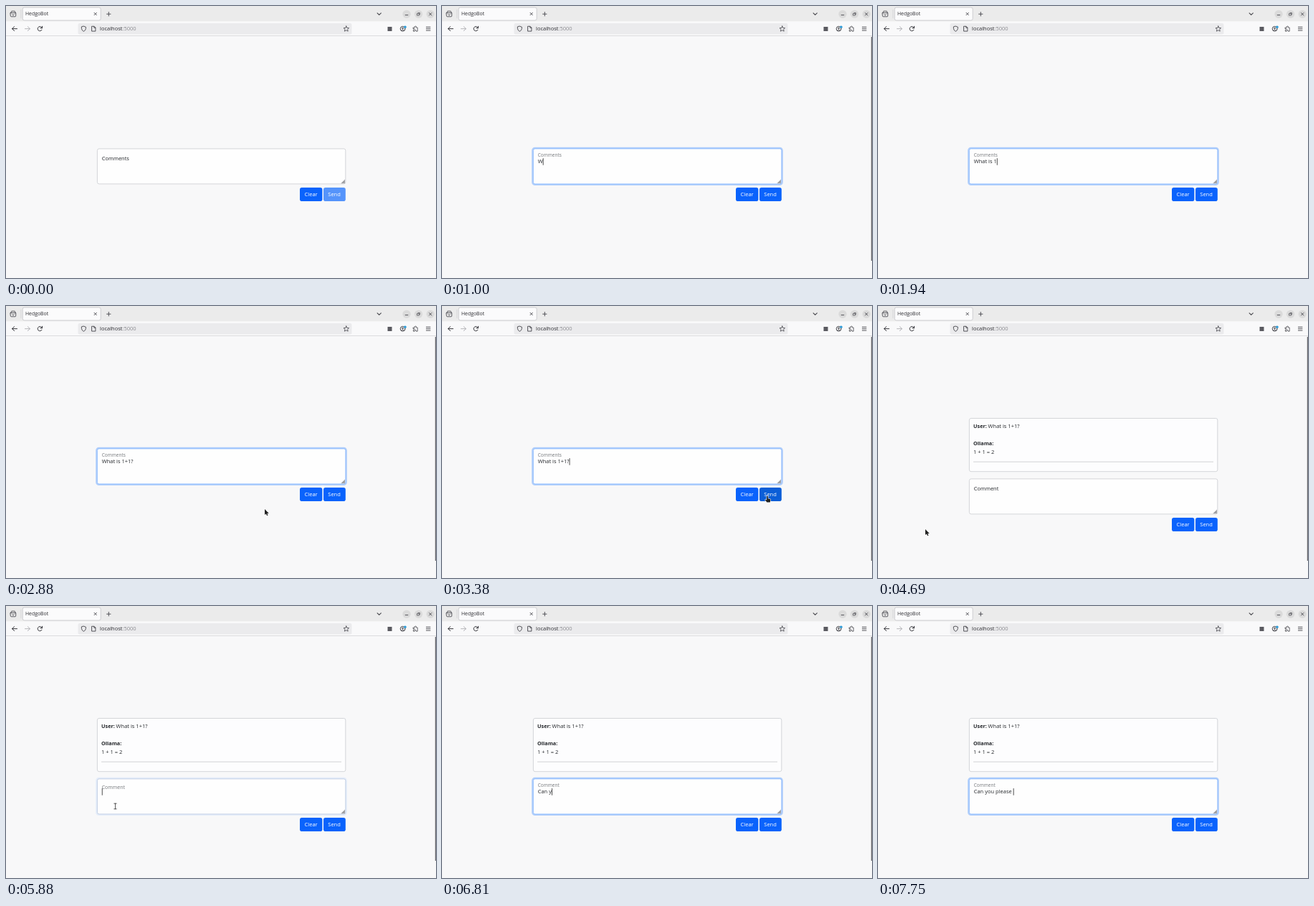
An HTML page with a canvas for the animation above (8000 ms loop, 600 px wide and 379 px high).

```html
<!DOCTYPE html>
<html lang="en">
<head>
<meta charset="utf-8">
<title>Chat page</title>
<style>
html, body { margin: 0; width: 100%; height: 100%; overflow: hidden; background: #f8f8f9; }
canvas { display: block; width: 600px; height: 379px; }
</style>
</head>
<body>
<canvas id="stage"></canvas>
<script>
const LOOP = 8000, STEP = 62.5;
const FONT = '"Open Sans", "Noto Sans", sans-serif';
const INK = '#24272b', ICON = '#45454b', BLUE = '#0a63fc', HOVER = '#0b5ed7';
const LEFT = 127, WIDTH = 347;

const canvas = document.getElementById('stage');
const ctx = canvas.getContext('2d');
const dpr = window.devicePixelRatio || 1;
canvas.width = 600 * dpr;
canvas.height = 379 * dpr;

// Times of the main events
const FOCUS_1 = 610, SEND = 3490, REPLY = 4300, DONE = 4610, FOCUS_2 = 5823;

const typing = [
  { text: 'What is 1+1?', keys: [990, 1120, 1185, 1245, 1370, 1435, 1555, 1680, 1930, 2060, 2185, 2430] },
  { text: 'Can you please ', keys: [6245, 6495, 6555, 6685, 6805, 6870, 6930, 7055, 7180, 7240, 7305, 7370, 7495, 7620, 7740] }
];

// Pointer paths: time, x, y
const paths = [
  [[60, 420, 318], [250, 352, 270], [450, 262, 230], [990, 260, 229]],
  [[2620, 260, 229], [2750, 304, 256], [2875, 361, 283], [3060, 418, 277], [3310, 455, 265],
   [3500, 452, 265], [3562, 442, 266], [3625, 403, 271], [3688, 280, 286], [3750, 132, 304],
   [3812, 66, 311], [4870, 66, 311], [5060, 78, 305], [5310, 122, 288], [5620, 152.5, 279], [6245, 152.5, 279]]
];

const clamp = v => Math.max(0, Math.min(1, v));
const ease = v => { v = clamp(v); return v * v * (3 - 2 * v); };
const mix = (a, b, k) => a + (b - a) * k;

function write(str, x, y, size = 7.5, color = INK, weight = 400) {
  ctx.font = `${weight} ${size}px ${FONT}`;
  ctx.fillStyle = color;
  ctx.fillText(str, x, y);
}

function box(x, y, w, h, r, fill, stroke, line = 1) {
  ctx.beginPath();
  ctx.roundRect(x, y, w, h, r);
  if (fill) { ctx.fillStyle = fill; ctx.fill(); }
  if (stroke) { ctx.strokeStyle = stroke; ctx.lineWidth = line; ctx.stroke(); }
}

function rect(x, y, w, h, color) {
  ctx.fillStyle = color;
  ctx.fillRect(x, y, w, h);
}

function disc(x, y, r, color) {
  ctx.beginPath();
  ctx.arc(x, y, r, 0, 7);
  ctx.fillStyle = color;
  ctx.fill();
}

// Line icon centred on x, y
function icon(x, y, d, color = ICON, line = 0.9) {
  ctx.save();
  ctx.translate(x, y);
  ctx.strokeStyle = color;
  ctx.lineWidth = line;
  ctx.lineCap = ctx.lineJoin = 'round';
  ctx.stroke(new Path2D(d));
  ctx.restore();
}

function drawBrowser() {
  rect(0, 0, 600, 379, '#f8f8f9');
  rect(0, 0, 600, 21.5, '#ebebeb');
  rect(0, 21.5, 600, 20, '#f9f9fa');
  rect(0, 41, 600, 0.8, '#d6d6d8');

  icon(10, 11, 'M-3.7 -1.4H3.7V2.8Q3.7 3.8 2.7 3.8H-2.7Q-3.7 3.8 -3.7 2.8ZM-3.3 -1.6L-2.2 -3.8H2.2L3.3 -1.6M-1.3 .8L0 2L1.3 .8');
  rect(20.5, 5, 0.7, 12, '#d2d2d4');
  box(23.2, 2, 109, 18, 2.5, '#fbfbfc', '#c4c4c8', 0.8);
  write('HedgoBot', 27, 13.4, 6.9, '#2c2c31');
  icon(124.7, 11, 'M-1.7 -1.7L1.7 1.7M1.7 -1.7L-1.7 1.7');
  icon(143.3, 11.2, 'M-2.7 0H2.7M0 -2.7V2.7');
  icon(520.7, 11, 'M-2.6 -1.2L0 1.4L2.6 -1.2', ICON, 1.1);
  for (const x of [559, 575.6, 592.2]) disc(x, 11.3, 5.6, '#dadada');
  icon(559, 12.6, 'M-1.8 0H1.8');
  icon(575.6, 11.3, 'M-1.7 -.7H.8V1.8H-1.7ZM-.6 -1.8H1.8V.6', ICON, 0.7);
  icon(592.2, 11.3, 'M-1.7 -1.7L1.7 1.7M1.7 -1.7L-1.7 1.7');

  icon(12, 31.7, 'M3.5 0H-3.4M-.4 -3L-3.4 0L-.4 3', '#303036', 1);
  icon(30, 31.7, 'M-3.5 0H3.4M.4 -3L3.4 0L.4 3', '#b4b4b8', 1);
  icon(47.3, 31.7, 'M3 -.9A3.1 3.1 0 1 0 2.7 1.6M3.2 -3.4V-.9H.8', '#303036', 1);

  box(100.5, 24, 382, 15.4, 2.5, '#ebebed');
  icon(108.4, 31.7, 'M0 -3.5L3 -2.4V-.4Q2.8 2.3 0 3.7Q-2.8 2.3 -3 -.4V-2.4Z');
  icon(122.4, 31.7, 'M-2.4 -3.4H.6L2.5 -1.5V3.4H-2.4ZM.5 -3.3V-1.4H2.4');
  write('localhost', 131, 34.3, 7.5, '#2c2c31');
  const hostWidth = ctx.measureText('localhost').width;
  write(':5000', 131 + hostWidth, 34.3, 7.5, '#8c8c91');
  icon(474.8, 31.8, 'M0 -3.8L1.1 -1.3L3.8 -1.1L1.8 .7L2.4 3.4L0 2L-2.4 3.4L-1.8 .7L-3.8 -1.1L-1.1 -1.3Z', ICON, 0.8);

  box(532.5, 29, 6, 6, 0, '#5a5a60');
  icon(553.6, 31.8, 'M3.4 0A3.4 3.4 0 1 1 -3.4 0A3.4 3.4 0 1 1 3.4 0M-2 2.4Q0 .2 2 2.4M-.9 -.8A.9 .9 0 1 0 .9 -.8A.9 .9 0 1 0 -.9 -.8', ICON, 1);
  disc(556.9, 29.3, 1.8, '#2d9bd8');
  icon(571.4, 31.8, 'M-3 -1.8H-1Q-1.5 -3.7 0 -3.7Q1.5 -3.7 1 -1.8H2.8V3.4H.9Q.9 1.6 -.2 1.6Q-1.3 1.6 -1.2 3.4H-3V1.3Q-1.3 1.4 -1.3 .4Q-1.3 -.6 -3 -.3Z', ICON, 0.8);
  icon(589.2, 31.7, 'M-2.8 -2.4H2.8M-2.8 0H2.8M-2.8 2.4H2.8');
}

function drawChat(t, top, h) {
  box(LEFT + 0.4, top + 0.5, WIDTH - 0.6, h - 0.8, 2.5, '#fdfdfe', '#c9ccd0', 0.8);
  write('User:', 133, top + 14.2, 7.3, INK, 700);
  write('What is 1+1?', 153.6, top + 14.2);
  if (t < REPLY) return;
  write('Ollama:', 133, top + 38, 7.3, INK, 700);
  const shown = 1 + 2 * Math.floor((t - REPLY) / STEP);
  write('1 + 1 = 2'.slice(0, shown), 133, top + 49.8);
  if (t >= DONE) rect(133, top + 60.7, 335, 0.8, '#c6c7c9');
}

function drawField(t, top, label, focusAt, entry) {
  const lift = ease((t - focusAt) / 100), glow = ease((t - focusAt) / 150);
  if (glow) box(LEFT - 0.6, top - 0.6, WIDTH + 1.2, 51, 3.2, null, `rgba(13,110,253,${0.3 * glow})`, 2.4);
  const edge = [[201, 134], [204, 183], [208, 254]].map(([a, b]) => Math.round(mix(a, b, glow)));
  box(LEFT + 0.4, top + 0.4, WIDTH - 0.6, 49, 2.5, '#fefefe', `rgb(${edge})`, 0.8);

  ctx.beginPath();
  ctx.moveTo(473, top + 43);
  ctx.lineTo(473, top + 48.8);
  ctx.lineTo(467.2, top + 48.8);
  ctx.fillStyle = '#a8a9ac';
  ctx.fill();
  icon(472, top + 47.8, 'M-2 0L0 -2', '#77787b', 0.6);

  write(label, 133.7, top + mix(16.7, 11.7, lift), mix(7.5, 6.5, lift), lift > 0 ? '#74777b' : INK);
  if (!lift) return;
  const keys = entry.keys.filter(k => k <= t);
  const text = entry.text.slice(0, keys.length);
  write(text, 133.7, top + 20.9);
  const last = keys.length ? keys[keys.length - 1] : focusAt;
  if ((t - last) % 800 < 400) rect(133.8 + ctx.measureText(text).width, top + 13.6, 0.8, 9.6, '#222');
}

function drawButton(x, y, w, label, textX, color) {
  box(x, y, w, 19, 2.8, color);
  write(label, textX, y + 12.2, 7.5, '#fff');
}

function pointerAt(t) {
  const path = paths.find(p => t >= p[0][0] && t < p[p.length - 1][0]);
  if (!path) return null;
  const i = path.findIndex(p => p[0] > t);
  const [t0, x0, y0] = path[i - 1], [t1, x1, y1] = path[i];
  const k = (t - t0) / (t1 - t0);
  return { x: mix(x0, x1, k), y: mix(y0, y1, k) };
}

const arrow = new Path2D('M0 0V8.1L1.9 6.4L3.1 9.2L4.5 8.6L3.3 5.9H5.8Z');
const hand = new Path2D('M-.8 0Q0 -.8 .8 0V3.3L3.8 4Q4.6 4.3 4.4 5.4L3.8 8.6H-.6L-3 5.4Q-2.8 4.3 -.8 5.4Z');

function drawPointer({ x, y }, kind) {
  if (kind === 'text') {
    icon(x, y, 'M-1.7 -3.8H1.7M-1.7 3.8H1.7M0 -3.8V3.8', '#fff', 1.6);
    icon(x, y, 'M-1.7 -3.8H1.7M-1.7 3.8H1.7M0 -3.8V3.8', '#333', 0.8);
    return;
  }
  const shape = kind === 'hand' ? hand : arrow;
  ctx.save();
  ctx.translate(x, y);
  ctx.strokeStyle = '#fff';
  ctx.lineWidth = 1.2;
  ctx.stroke(shape);
  ctx.fillStyle = '#222';
  ctx.fill(shape);
  ctx.restore();
}

function draw(t) {
  ctx.setTransform(dpr, 0, 0, dpr, 0, 0);
  drawBrowser();

  // The whole group stays centred on y = 235
  const chatH = t < SEND ? 0 : t < REPLY ? 43 : t < DONE ? 59 : 75;
  const top = chatH ? 235 - (chatH + 83) / 2 : 0;
  const field = chatH ? top + chatH + 9.5 : 198.5;
  if (chatH) drawChat(t, top, chatH);

  if (t < SEND) drawField(t, field, 'Comments', FOCUS_1, typing[0]);
  else drawField(t, field, t < DONE ? 'Processing request...' : 'Comment', FOCUS_2, typing[1]);

  const p = pointerAt(t), by = field + 54.6;
  const inside = (x, y, w, h) => p && p.x >= x && p.x <= x + w && p.y >= y && p.y <= y + h;
  const onClear = inside(410, by, 31.4, 19), onSend = inside(443, by, 31, 19);
  drawButton(410, by, 31.4, 'Clear', 416.6, onClear ? HOVER : BLUE);
  drawButton(443, by, 30.8, 'Send', 449.3, t < 990 ? '#5594fb' : onSend ? HOVER : BLUE);

  if ((t >= 60 && t < 1620) || (t >= 2620 && t < 7180)) rect(598.8, 43, 1.2, 312, '#68686c');
  if (p) drawPointer(p, inside(LEFT, field, WIDTH, 50) ? 'text' : onClear || onSend ? 'hand' : 'arrow');
}

function loop(now) {
  const t = now % LOOP;
  draw(Math.min(Math.floor((t + 4) / STEP) * STEP, LOOP - STEP));
  requestAnimationFrame(loop);
}
requestAnimationFrame(loop);
</script>
</body>
</html>
```
